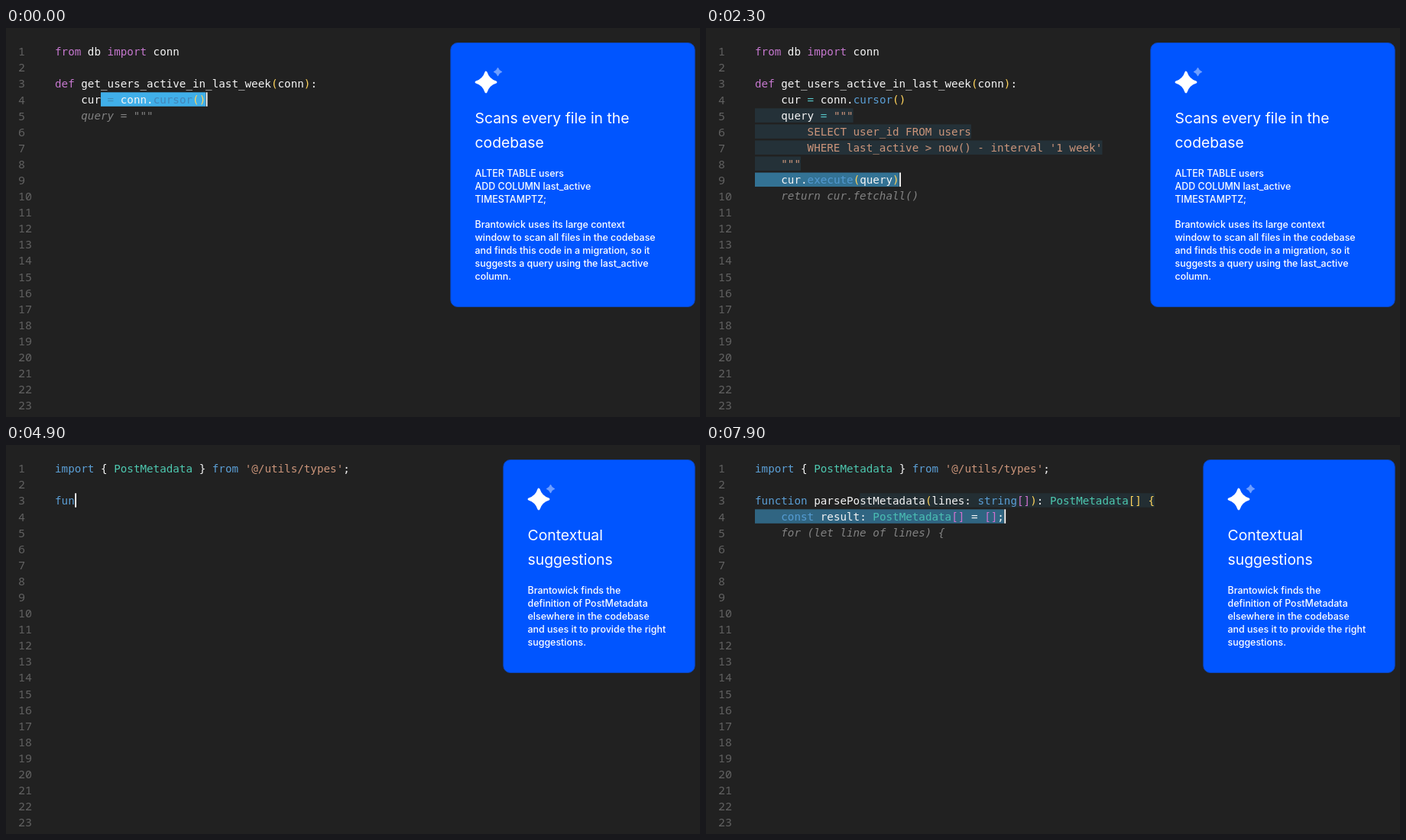
Animation, 908 px wide and 510 px high, one loop 8000 ms. Source, as an HTML page with a canvas:

```html
<!DOCTYPE html>
<html lang="en">
<head>
<meta charset="utf-8">
<title>Code completion</title>
<style>
html, body { margin: 0; width: 100%; height: 100%; overflow: hidden; background: #212121; }
canvas { display: block; }
</style>
</head>
<body>
<canvas id="stage" width="908" height="510"></canvas>
<script>
const ctx = document.getElementById('stage').getContext('2d');
const LOOP = 8000, SWITCH = 4900, FADE = 800;
const LEFT = 64, CHAR = 8.575, LINE = 21.05;
const CODE = '14.24px "DejaVu Sans Mono", "Noto Sans Mono", monospace';
const NUMBER = '500 15px "Noto Sans Mono", monospace';
const SANS = 'Inter, "Open Sans", sans-serif';

// Code is written as "~" + colour letter + text
const COLORS = {
  w: '#f4f4f4', p: '#c678cf', b: '#5b9fd6', t: '#4ec9b0',
  o: '#56c5c8', s: '#cc957a', g: '#ffd45c', m: '#d071cf'
};
const DIMMED = 'bto';

const parse = code => code.split('~').slice(1).map(s => [s[0], s.slice(1)]);
const plain = code => parse(code).map(s => s[1]).join('');
const clamp = v => Math.max(0, Math.min(1, v));
const colX = col => LEFT + col * CHAR;
const rowY = row => 30.35 + (row - 1) * LINE;

const python = {
  fixed: [
    [1, '~pfrom~w db ~pimport~w conn'],
    [3, '~pdef~w get_users_active_in_last_week~g(~wconn~g)~w:'],
    [4, '~w    cur']
  ],
  // ghost: time the suggestion appears, accept: time it is taken
  blocks: [
    { row: 4, col: 7, ghost: -500, accept: -20, lines: ['~o =~w conn.~bcursor~g()'] },
    { row: 5, col: 0, ghost: 0, accept: 1590, lines: [
      '~w    query ~o=~s """',
      '~s        SELECT user_id FROM users',
      "~s        WHERE last_active > now() - interval '1 week'",
      '~s    """'] },
    { row: 9, col: 0, ghost: 1650, accept: 1945, lines: ['~w    cur.~bexecute~g(~wquery~g)'] },
    { row: 10, col: 0, ghost: 2000, accept: 2425, lines: ['~p    return~w cur.~bfetchall~g()'] }
  ],
  card: {
    x: 582, w: 319, h: 346,
    title: ['Scans every file in the', 'codebase'],
    body: [
      ['ALTER TABLE users', 'ADD COLUMN last_active', 'TIMESTAMPTZ;'],
      ['Brantowick uses its large context', 'window to scan all files in the codebase',
       'and finds this code in a migration, so it', 'suggests a query using the last_active', 'column.']
    ]
  }
};

const script = {
  fixed: [[1, "~bimport~w { ~tPostMetadata~w } ~bfrom~s '@/utils/types'~w;"]],
  typed: {
    row: 3, code: '~bfunction~w parsePo', start: 3,
    keys: [5000, 5100, 5200, 5300, 5400, 5500, 5700, 5800, 5900, 6000, 6200, 6400, 6600]
  },
  blocks: [
    { row: 3, col: 16, ghost: 6700, accept: 7170, lines: [
      '~wstMetadata~g(~wlines: ~bstring~m[]~g)~w: ~tPostMetadata~g[] {'] },
    { row: 4, col: 0, ghost: 7190, accept: 7475, lines: [
      '~b    const~w result: ~tPostMetadata~m[]~w = ~m[]~w;'] },
    { row: 5, col: 0, ghost: 7800, accept: Infinity, lines: ['~w    for (let line of lines) {'] }
  ],
  card: {
    x: 651, w: 250, h: 279,
    title: ['Contextual', 'suggestions'],
    body: [['Brantowick finds the', 'definition of PostMetadata', 'elsewhere in the codebase',
            'and uses it to provide the right', 'suggestions.']]
  }
};

function write(text, x, y, font, color) {
  ctx.font = font;
  ctx.fillStyle = color;
  ctx.fillText(text, x, y);
}

function drawCode(code, row, col = 0, limit = Infinity, heat = 0) {
  for (const [key, part] of parse(code)) {
    const text = part.slice(0, Math.max(0, limit));
    const put = color => write(text, colX(col), rowY(row) + 5.3, CODE, color);
    put(COLORS[key]);
    if (heat && DIMMED.includes(key)) {
      ctx.globalAlpha = heat * heat;
      put('#3d88ba');
      ctx.globalAlpha = 1;
    }
    col += part.length;
    limit -= part.length;
  }
}

function drawBlock(block, t) {
  const heat = t < block.accept ? 0 : clamp(1 - (t - block.accept) / FADE);
  block.lines.forEach((code, i) => {
    const row = block.row + i, text = plain(code);
    if (t >= block.accept) {
      ctx.globalAlpha = heat;
      ctx.fillStyle = '#41b3ef';
      ctx.fillRect(colX(block.col), rowY(row) - 9.2, text.length * CHAR, 18.5);
      ctx.globalAlpha = 1;
      drawCode(code, row, block.col, Infinity, heat);
    } else if (t >= block.ghost + i * 100) {
      write(text, colX(block.col), rowY(row) + 5.3, 'italic ' + CODE, '#828282');
    }
  });
}

function drawCursor(row, col, alpha) {
  ctx.globalAlpha = alpha;
  ctx.fillStyle = '#fff';
  ctx.fillRect(colX(col) + 0.5, rowY(row) - 9.2, 1.8, 18.5);
  ctx.globalAlpha = 1;
}

function drawStar(x, y, r, color) {
  const k = r * 0.24;
  ctx.beginPath();
  ctx.moveTo(x, y - r);
  ctx.quadraticCurveTo(x + k, y - k, x + r, y);
  ctx.quadraticCurveTo(x + k, y + k, x, y + r);
  ctx.quadraticCurveTo(x - k, y + k, x - r, y);
  ctx.quadraticCurveTo(x - k, y - k, x, y - r);
  ctx.closePath();
  ctx.fillStyle = ctx.strokeStyle = color;
  ctx.lineWidth = r / 4;
  ctx.lineJoin = 'round';
  ctx.fill();
  ctx.stroke();
}

function drawCard({ x, w, h, title, body }) {
  ctx.fillStyle = '#0055ff';
  ctx.strokeStyle = '#0a46c0';
  ctx.lineWidth = 1;
  ctx.beginPath();
  ctx.roundRect(x - 0.2, 19.5, w + 0.4, h, 9);
  ctx.fill();
  ctx.stroke();
  drawStar(x + 46, 71, 12.8, '#fff');
  drawStar(x + 61.5, 57.5, 5, '#6f9fff');
  const left = x + 31.5;
  title.forEach((s, i) => write(s, left, 125 + i * 32, '19.35px ' + SANS, '#fff'));
  let y = 194.5;
  for (const paragraph of body) {
    for (const s of paragraph) {
      write(s, left, y, '500 12.45px ' + SANS, '#fff');
      y += 17;
    }
    y += 16;
  }
}

function draw(t) {
  const scene = t < SWITCH ? python : script;
  ctx.fillStyle = '#212121';
  ctx.fillRect(0, 0, 908, 510);
  for (let n = 1; n <= 23; n++) {
    write(n, 16, 36.3 + (n - 1) * 21.09, NUMBER, '#626262');
  }
  for (const [row, code] of scene.fixed) drawCode(code, row);

  let cursor;
  if (scene.typed) {
    const { row, code, start, keys } = scene.typed;
    const count = start + keys.filter(k => k <= t).length;
    drawCode(code, row, 0, count);
    cursor = [row, count, 1];
  }
  for (const block of scene.blocks) {
    drawBlock(block, t);
    if (t >= block.accept) {
      const last = block.lines.length - 1;
      cursor = [block.row + last, block.col + plain(block.lines[last]).length,
                clamp((block.accept + 1110 - t) / 200)];
    }
  }
  drawCursor(...cursor);
  drawCard(scene.card);
}

function tick() {
  draw(performance.now() % LOOP);
  requestAnimationFrame(tick);
}
tick();
</script>
</body>
</html>
```
